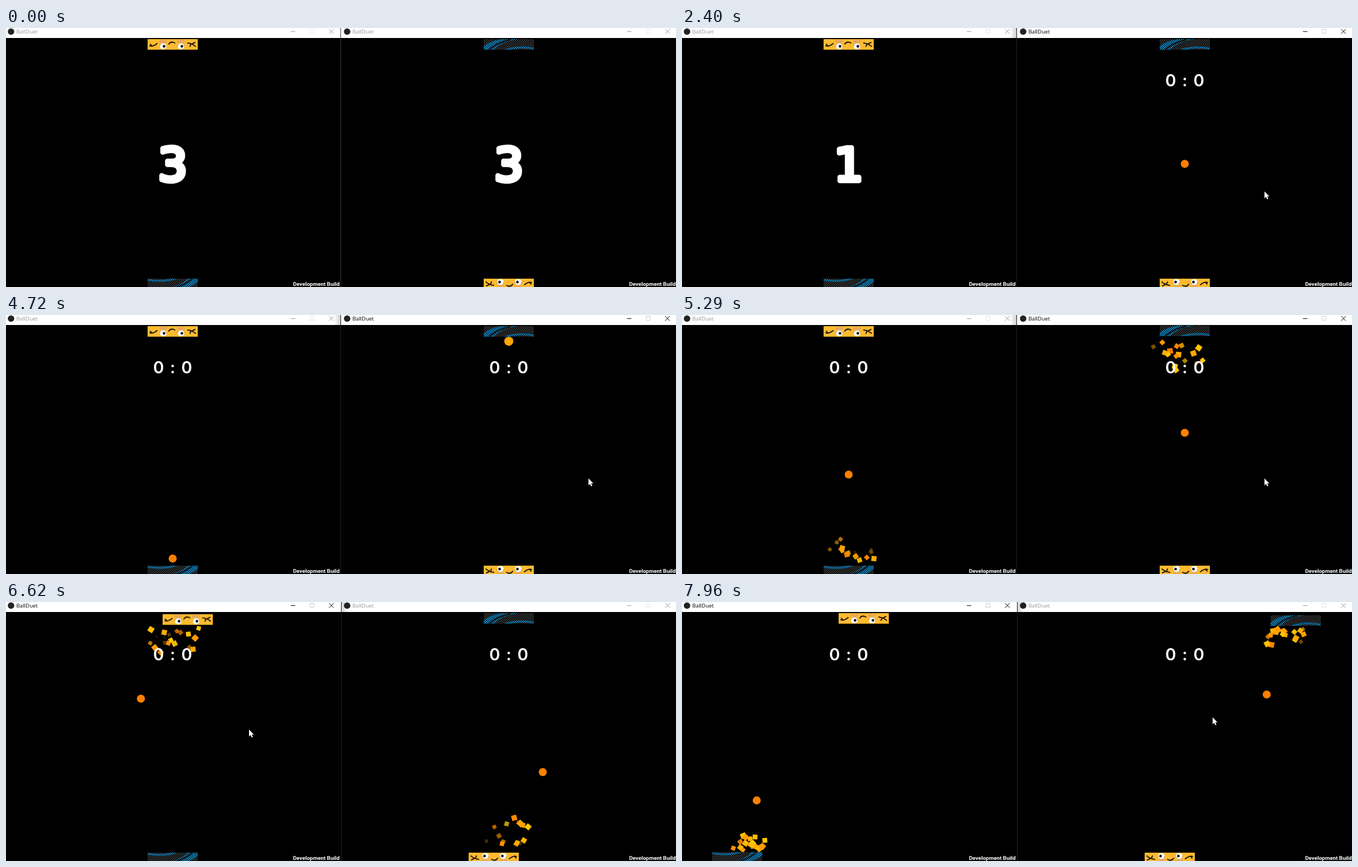
These frames come from a looping animation (1202 px wide and 466 px high, 8000 ms). An HTML page with a canvas:

```html
<!DOCTYPE html>
<html lang="en">
<head>
<meta charset="utf-8">
<title>BallDuet</title>
<style>
html, body { margin: 0; width: 100%; height: 100%; overflow: hidden; background: #000; }
canvas { display: block; }
</style>
</head>
<body>
<canvas id="stage" width="1202" height="466"></canvas>
<script>
const g = document.getElementById('stage').getContext('2d');
const TOP = 46, BOTTOM = 443;   // ball centre at each bounce
const STEP = 70.38, SERVE = 2400;

// Each window: ball path [time, x, y] and paddle paths [time, x]
const windows = [
  { x: 0, lag: 70, edge: 598.5,
    ball: [[2440, 299, 244.5], [3213, 299, TOP], [4741, 299, BOTTOM], [5286, 299, 287],
           [6125, 299, TOP], [6623, 242, 174], [7665, 122, BOTTOM], [7960, 134, 357]],
    yellow: [[5580, 299], [5680, 326]], blue: [[6640, 299], [7360, 99]], yellowTop: true },
  { x: 603, lag: 0, edge: 1201.5,
    ball: [[2400, 902, 244.5], [3176, 902, BOTTOM], [4718, 902, TOP], [5286, 902, 212],
           [6084, 902, BOTTOM], [6623, 963, 306], [7565, 1079, TOP], [7960, 1049, 166.5]],
    yellow: [[5500, 902], [5600, 875]], blue: [[6720, 902], [7460, 1101]], yellowTop: false }
];
const cursorPath = [[130, 1077, 335], [131, 1077, 335], [200, 1045, 294], [5900, 1045, 294],
                    [6250, 436, 229.5], [7480, 436, 229.5], [7850, 952, 207.5]];

const rand = n => { const v = Math.sin(n * 127.1) * 43758.5453; return v - Math.floor(v); };

function along(path, t) {
  if (t <= path[0][0]) return path[0].slice(1);
  for (let i = 1; i < path.length; i++) {
    const a = path[i - 1], b = path[i];
    if (t <= b[0]) {
      const k = (t - a[0]) / (b[0] - a[0]);
      return a.slice(1).map((v, j) => v + (b[j + 1] - v) * k);
    }
  }
  return path[path.length - 1].slice(1);
}

function stroke(c, color, width, path) {
  c.strokeStyle = color;
  c.lineWidth = width;
  c.stroke(new Path2D(path));
}

function disc(c, x, y, r, color) {
  c.fillStyle = color;
  c.beginPath();
  c.arc(x, y, r, 0, 7);
  c.fill();
}

function text(str, x, y, font, color, align) {
  g.font = font;
  g.fillStyle = color;
  g.textAlign = align;
  g.fillText(str, x, y);
}

function texture(paint) {
  const c = document.createElement('canvas');
  c.width = 90;
  c.height = 19;
  paint(c.getContext('2d'));
  return c;
}

const yellowSkin = texture(c => {
  c.fillStyle = '#ffba30';
  c.fillRect(0, 0, 90, 19);
  for (const x of [28, 60]) {
    stroke(c, '#d99a72', 1.3, `M${x - 6} 7l1-5l3 4l1-5l3 5l3-5l1 5`);
    disc(c, x, 12.5, 6, '#fff');
    stroke(c, '#a87830', 0.8, `M${x - 6} 13a6 6 0 0 1 12 0`);
    disc(c, x + 1.5, 13, 2.4, '#111');
  }
  c.lineCap = 'round';
  stroke(c, '#221a10', 2, 'M4 12q6 2 13-4M8 13l-3-4M38 9q4-6 11-2M72 7q8 1 14 6M79 9l6-3M78 9l-2 4');
});

const blueSkin = texture(c => {
  c.fillStyle = '#333';
  c.fillRect(0, 0, 90, 19);
  c.fillStyle = '#1193d8';
  c.fill(new Path2D('M0 19V13Q12 3 32 0H62Q34 4 18 19Z'));
  stroke(c, '#1193d8', 3.5, 'M38 20Q60 12 90 17');
  stroke(c, '#222', 3, 'M10 19Q24 6 48 1');
  c.fillStyle = 'rgba(0,0,0,.75)';
  for (let y = 0; y < 19; y += 2)
    for (let x = y % 4; x < 90; x += 4) c.fillRect(x, y, 2, 2);
});

// Damped spring after a hit; positive is towards the middle
function recoil(age) {
  return age < 0 || age > 700 ? 0 : -5 * Math.exp(-age / 1200) * Math.sin(age * 2 * Math.PI / 540);
}

function paddle(skin, x, top, push) {
  g.save();
  g.translate(x, top ? 29.5 + push : 460.5 - push);
  if (!top) g.rotate(Math.PI);
  g.drawImage(skin, -45, -9.5);
  g.restore();
}

function burst(age, x, y, dir, seed) {
  for (let i = 0; i < 19; i++) {
    const r = k => rand(seed * 97 + i * 7 + k);
    const life = 480 + 560 * r(1);
    if (age >= life) continue;
    const angle = Math.PI * (0.04 + 0.92 * r(2)), dist = age * (0.025 + 0.085 * r(3));
    const left = Math.min(1, (life - age) / 260);
    const size = (7.5 + 2.5 * r(4)) * Math.min(1, age / 80) * (0.5 + 0.5 * left);
    g.save();
    g.globalAlpha = left;
    g.translate(x + (r(5) - 0.5) * 16 + Math.cos(angle) * dist,
                y + dir * (3 + Math.sin(angle) * dist));
    g.rotate(r(6) * 6 + age * (r(7) - 0.5) * 0.004);
    g.fillStyle = `rgb(255,${128 + Math.floor(80 * r(8))},0)`;
    g.fillRect(-size / 2, -size / 2, size, size);
    g.restore();
  }
}

function titleBar(x, active) {
  const ink = active ? '#000' : '#999';
  g.fillStyle = '#fff';
  g.fillRect(x - 3, 0, 604, 18);
  disc(g, x + 9, 6.5, 5.8, '#222');
  text('BallDuet', x + 18.5, 10, '9.7px "Open Sans", sans-serif', ink, 'left');
  g.save();
  g.translate(x, 0);
  stroke(g, ink, 1, 'M511 6.5h8M579.5 2l8.5 8.5m0-8.5l-8.5 8.5');
  stroke(g, active ? '#ccc' : '#e4e4e4', 1, 'M545.5 2.5h7v7h-7z');
  g.restore();
}

function score(cx) {
  g.letterSpacing = '1.7px';
  text('0 : 0', cx + 0.8, 104.5, '600 29.5px Inter, sans-serif', '#fff', 'center');
  g.letterSpacing = '0px';
}

// Round outline gives the digit its soft, heavy corners
function countdown(digit, cx) {
  text(digit, cx, 275, '82px "DejaVu Sans", sans-serif', '#fff', 'center');
  g.strokeStyle = '#fff';
  g.lineWidth = 8.5;
  g.lineJoin = 'round';
  g.strokeText(digit, cx, 275);
  g.lineJoin = 'miter';
}

function drawWindow(w, t, active, seed) {
  const cx = w.x + 299, playing = t >= SERVE + w.lag;
  const push = { true: 0, false: 0 };
  let flash = 0;
  w.ball.forEach(([at, x, y], i) => {
    if (y !== TOP && y !== BOTTOM || t < at) return;
    const top = y === TOP, age = t - at;
    push[top] = recoil(age);
    flash = Math.max(0, 1 - age / 120);
    burst(age, x, top ? 39 : 450, top ? 1 : -1, seed + i);
  });
  paddle(yellowSkin, along(w.yellow, t)[0], w.yellowTop, push[w.yellowTop]);
  paddle(blueSkin, along(w.blue, t)[0], !w.yellowTop, push[!w.yellowTop]);

  if (playing) {
    const [x, y] = along(w.ball, t);
    disc(g, x, y, 7.2 + flash, `rgb(255,${Math.round(128 + 38 * flash)},0)`);
    score(cx);
  } else {
    const s = t - w.lag;
    countdown(s < 480 ? '3' : s < 1470 ? '2' : '1', cx);
  }
  text('Development Build', w.edge, 464, 'bold 9.9px Roboto, sans-serif', '#fff', 'right');
  titleBar(w.x, active);
}

function divider(active) {
  const x = active === 0 ? 601 : 600;
  g.fillStyle = active < 0 ? '#3a3a3a' : '#222';
  g.fillRect(x, 0, 1, 466);
  if (active < 0) return;
  // soft shadow the active window casts on its neighbour
  const far = active ? 589 : 612;
  const shade = g.createLinearGradient(x, 0, far, 0);
  shade.addColorStop(0, 'rgba(0,0,0,.2)');
  shade.addColorStop(1, 'rgba(0,0,0,0)');
  g.fillStyle = shade;
  g.fillRect(Math.min(x, far), 0, 12, 18);
}

function cursor(t) {
  if (t < 130) return;
  const [x, y] = along(cursorPath, t < 200 ? 130 : t);
  g.save();
  g.translate(x, y);
  const arrow = 'M0 0V12.5L2.8 9.8L4.8 14.2L6.8 13.3L4.9 9H8.6Z';
  stroke(g, '#000', 1, arrow);
  g.fillStyle = '#fff';
  g.fill(new Path2D(arrow));
  g.restore();
}

function draw(now) {
  let t = now % 8000;
  if (t >= SERVE) t = SERVE + Math.floor((t - SERVE) / STEP + 0.1) * STEP;
  const active = t < 810 ? -1 : t < 6400 ? 1 : 0;
  g.fillStyle = '#000';
  g.fillRect(0, 0, 1202, 466);
  windows.forEach((w, i) => drawWindow(w, t, active === i, i * 20 + 3));
  divider(active);
  cursor(t);
}

function tick() {
  draw(performance.now());
  requestAnimationFrame(tick);
}
tick();
</script>
</body>
</html>
```
